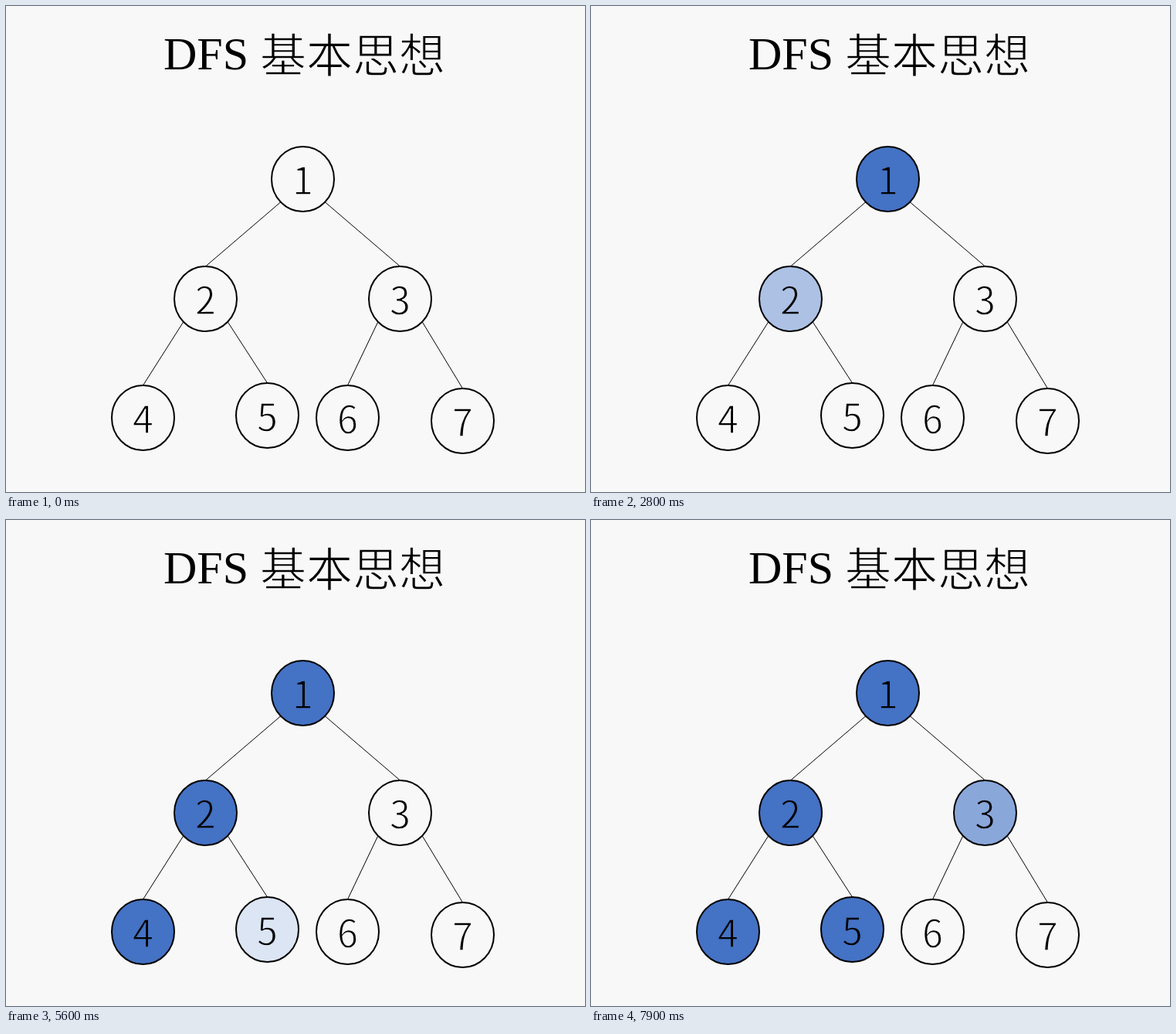
An HTML page that plays this animation: 750 px wide and 629 px high, repeating every 8000 ms.

```html
<!DOCTYPE html>
<html lang="zh-CN">
<head>
<meta charset="utf-8">
<title>DFS</title>
<style>
  html, body { margin: 0; width: 100%; height: 100%; overflow: hidden; background: #f8f8f8; }
  svg { display: block; width: 750px; height: 629px; }
  .latin { font: 60px "Liberation Serif", serif; }
  /* A stroke in the backdrop colour thins the regular weight. */
  .han, .digit { font-family: "Noto Sans CJK SC", "Noto Sans CJK", sans-serif; stroke: #f8f8f8; stroke-width: 1.3; }
  .han { font-size: 60px; }
  .digit { font-size: 48.5px; text-anchor: middle; }
  ellipse { fill: none; stroke: #000; stroke-width: 2; }
  line { stroke: #000; stroke-width: 1; }
</style>
</head>
<body>
<svg viewBox="0 0 750 629">
  <text class="latin" x="204" y="82">DFS</text>
  <text class="han" x="329" y="86">基本思想</text>
  <g id="tree"></g>
</svg>
<script>
const LOOP = 8000, START = 500, FADE = 1600, STEP = 200;
const RX = 40.5, RY = 42;
const BLUE = [68, 114, 196], BACKDROP = '#f8f8f8';
const VISIT_ORDER = [1, 2, 4, 5, 3];
// The picture advances every 200 ms, restarting its count at these times.
const ANCHORS = [500, 2000, 5700, 6000, 6100, 6600, 7900];
const CENTERS = [
  [384.5, 224], [258.5, 379], [510.5, 379],
  [177.5, 533], [338.5, 530], [442.5, 533], [591.5, 537]
];

const tree = document.getElementById('tree');

function add(tag, attributes) {
  const element = document.createElementNS(tree.namespaceURI, tag);
  for (const [name, value] of Object.entries(attributes)) element.setAttribute(name, value);
  return tree.appendChild(element);
}

// Edges run from a parent's lower diagonal to the top of its child.
CENTERS.slice(1).forEach(([x, y], i) => {
  const [px, py] = CENTERS[i >> 1];
  const side = i % 2 ? 1 : -1;
  add('line', { x1: px + side * RX * Math.SQRT1_2, y1: py + RY * Math.SQRT1_2, x2: x, y2: y - RY });
});

const nodes = CENTERS.map(([cx, cy], i) => {
  const circle = add('ellipse', { cx, cy, rx: RX, ry: RY });
  const digit = add('text', { class: 'digit', x: cx, y: cy + 19.5 });
  digit.textContent = i + 1;
  return { circle, digit };
});

function heldTime(t) {
  const anchor = ANCHORS.filter(a => a <= t).pop() ?? 0;
  return anchor + Math.floor((t - anchor) / STEP) * STEP;
}

function fillColor(progress) {
  if (progress < 0) return BACKDROP;
  const amount = Math.min(progress, 1);
  return `rgb(${BLUE.map(c => Math.round(255 + (c - 255) * amount))})`;
}

function draw(now) {
  const time = heldTime(now % LOOP);
  VISIT_ORDER.forEach((label, i) => {
    const { circle, digit } = nodes[label - 1];
    circle.style.fill = digit.style.stroke = fillColor((time - START) / FADE - i);
  });
  requestAnimationFrame(draw);
}
draw(0);
</script>
</body>
</html>
```
